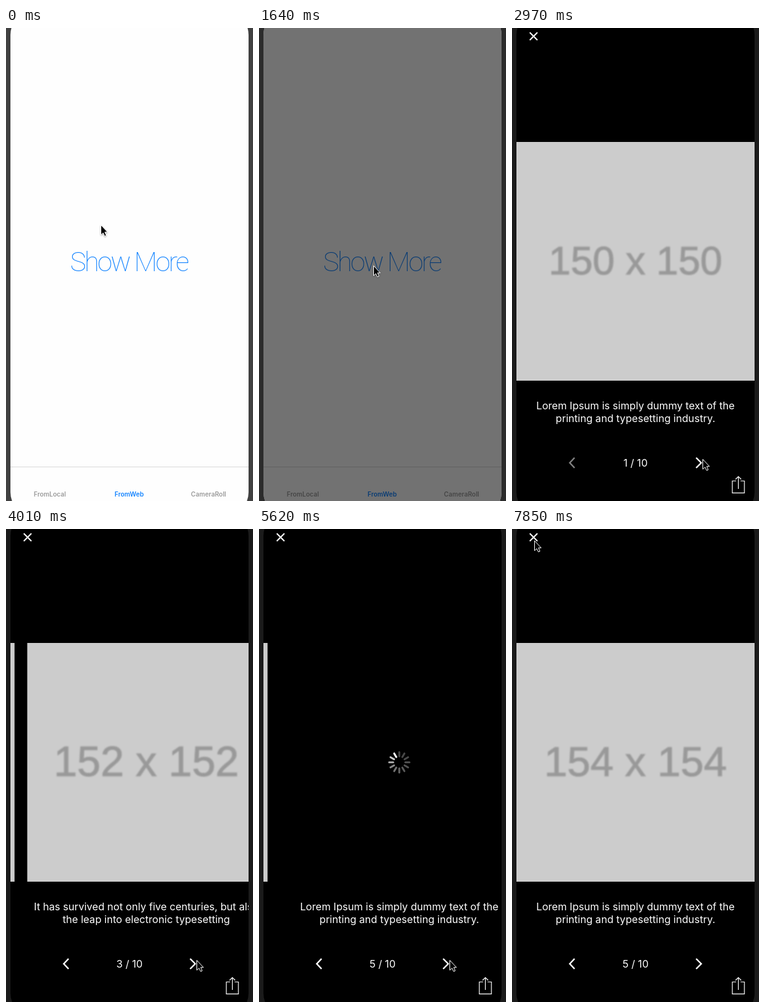
Animation, 389 px wide and 743 px high, one loop 8 s. Source, as an HTML page:

```html
<!DOCTYPE html>
<html lang="en">
<head>
<meta charset="utf-8">
<title>Image viewer</title>
<style>
  html, body { margin: 0; width: 100%; height: 100%; overflow: hidden; background: #1b1b1b; }
  svg { display: block; width: 100%; height: 100%; }
  text { font-family: Inter, Roboto, sans-serif; text-anchor: middle; }
  .title { font: 100 42.5px Roboto, Inter, sans-serif; letter-spacing: -2.7px; fill: #1283ff; }
  .tab { font-size: 10px; font-weight: 600; fill: #9b9b9b; }
  .tab.active { fill: #1283ff; }
  .caption, .counter { font-size: 16.1px; fill: #fff; }
  .size { font-family: "Liberation Sans", Arial, sans-serif; fill: #999; stroke: #999; filter: blur(.9px); }
  .icon { fill: none; stroke: #fff; }
  #cursor { filter: drop-shadow(0 1px 1px rgba(0, 0, 0, .35)); }
</style>
</head>
<body>
<svg viewBox="0 0 389 743">
  <defs>
    <clipPath id="screen"><rect x="7" y="-29" width="375" height="798" rx="40"/></clipPath>
  </defs>
  <rect id="bezel" width="389" height="743"/>
  <g clip-path="url(#screen)">
    <g id="home">
      <rect width="389" height="743" fill="#fefefe"/>
      <text class="title" x="193.5" y="382">Show More</text>
      <path d="M7 689.5H382" stroke="#d9d9d9"/>
      <text class="tab" x="69" y="736">FromLocal</text>
      <text class="tab active" x="194" y="736">FromWeb</text>
      <text class="tab" x="319" y="736">CameraRoll</text>
    </g>
    <rect id="shade" width="389" height="743"/>
    <g id="viewer">
      <g id="strip"></g>
      <path class="icon" stroke-width="2" d="M28 7L40 19M40 7L28 19"/>
      <path class="icon" id="previous" stroke-width="2.4" d="M98.5 675L91 683L98.5 691"/>
      <path class="icon" stroke-width="2.4" d="M290 675L298 683L290 691"/>
      <text class="counter" id="counter" x="194.5" y="689"></text>
      <path class="icon" stroke-width="1.2" d="M353 711.5H347V730.3H366V711.5H360M356.5 724V704.5M352 709L356.5 704.5L361 709"/>
    </g>
  </g>
  <path id="cursor" fill="#000" stroke="#fff" d="M0 0V15.5L3.5 12.3L6 17.5L8.5 16.5L6.2 11.2H10.5Z"/>
</svg>
<script>
const LOOP = 8000, TICK = 148, LAST_TICK = 53;
const PITCH = 395;                               // slide width plus gap
const VIEWER_OPEN = 14, IMAGE_LOADED = 44;

const captions = [
  ["Lorem Ipsum is simply dummy text of the", "printing and typesetting industry."],
  ["Lorem Ipsum has been the industry's", "standard dummy text ever since the 1500s"],
  ["It has survived not only five centuries, but also", "the leap into electronic typesetting"],
  ["It was popularised in the 1960s with the", "release of sheets containing passages"]
];
const slideStarts = [20, 24.5, 28.5, 35.5], SLIDE_TICKS = 3;
const cursorPath = [
  [1, 149, 309], [8, 180, 373], [15, 180, 373], [17, 309, 668], [18, 309, 668],
  [20, 300, 677], [42, 300, 677], [43, 303, 667], [46, 216, 373], [48, 216, 373],
  [49, 68, 72], [50, 68, 72], [53, 35, 18]
];

const $ = id => document.getElementById(id);
const clamp = v => Math.min(1, Math.max(0, v));
const ease = v => (1 - Math.cos(Math.PI * clamp(v))) / 2;
const show = (el, on) => el.setAttribute("visibility", on ? "inherit" : "hidden");
const move = (el, x, y) => el.setAttribute("transform", `translate(${x} ${y})`);

function slideMarkup(i) {
  const size = 150 + i;
  const fontSize = (i ? 26.9 : 24.9) * 375 / size;
  const [first, second] = captions[i % captions.length];
  return `<g transform="translate(${i * PITCH} 0)">
    <g id="image${i}">
      <rect x="7" y="179" width="375" height="375" fill="#ccc"/>
      <text class="size" x="194.5" y="${365.2 + fontSize * .345}" font-size="${fontSize}">${size} x ${size}</text>
    </g>
    <text class="caption" x="194.5" y="599">${first}</text>
    <text class="caption" x="194.5" y="619">${second}</text>
  </g>`;
}

const spokeMarkup = (_, i) =>
  `<path d="M0 -9.5V-16" stroke="#fff" stroke-width="3" stroke-linecap="round" transform="rotate(${i * 30})"/>`;

$("strip").innerHTML =
  Array.from({ length: 5 }, (_, i) => slideMarkup(i)).join("") +
  `<g id="spinner" transform="translate(${194.5 + 4 * PITCH} 366.5)">${Array.from({ length: 12 }, spokeMarkup).join("")}</g>`;
const spokes = [...$("spinner").children];

function cursorAt(tick) {
  const next = cursorPath.findIndex(key => key[0] >= tick);
  if (next <= 0) return cursorPath[0].slice(1);
  const [t0, x0, y0] = cursorPath[next - 1], [t1, x1, y1] = cursorPath[next];
  const p = (tick - t0) / (t1 - t0);
  return [x0 + (x1 - x0) * p, y0 + (y1 - y0) * p];
}

function draw(tick) {
  const viewing = tick >= VIEWER_OPEN;
  const fade = tick < 11 ? 0 : tick < 12 ? .55 : viewing ? 1 : .976;
  const grey = Math.round(65 - 38 * fade);
  $("bezel").setAttribute("fill", `rgb(${grey},${grey},${grey})`);
  $("shade").setAttribute("opacity", fade);
  show($("home"), !viewing);
  show($("viewer"), viewing);

  const page = slideStarts.reduce((sum, start) => sum + ease((tick - start) / SLIDE_TICKS), 0);
  const current = Math.round(page) + 1;
  move($("strip"), -page * PITCH, 0);
  $("counter").textContent = `${current} / 10`;
  $("previous").setAttribute("opacity", current > 1 ? 1 : .5);

  const loaded = tick >= IMAGE_LOADED;
  show($("image4"), loaded);
  show($("spinner"), !loaded);
  const head = Math.round(11 + (tick - 38) * TICK * 12 / 1000);
  spokes.forEach((spoke, i) => {
    const age = ((head - i) % 12 + 12) % 12;
    spoke.setAttribute("opacity", .25 + .75 * .72 ** age);
  });

  const [x, y] = cursorAt(tick).map(Math.round);
  move($("cursor"), x + .5, y + .5);
}

function frame() {
  const time = performance.now() % LOOP;
  draw(Math.min(LAST_TICK, Math.floor((time + 10) / TICK)));
  requestAnimationFrame(frame);
}
frame();
</script>
</body>
</html>
```
